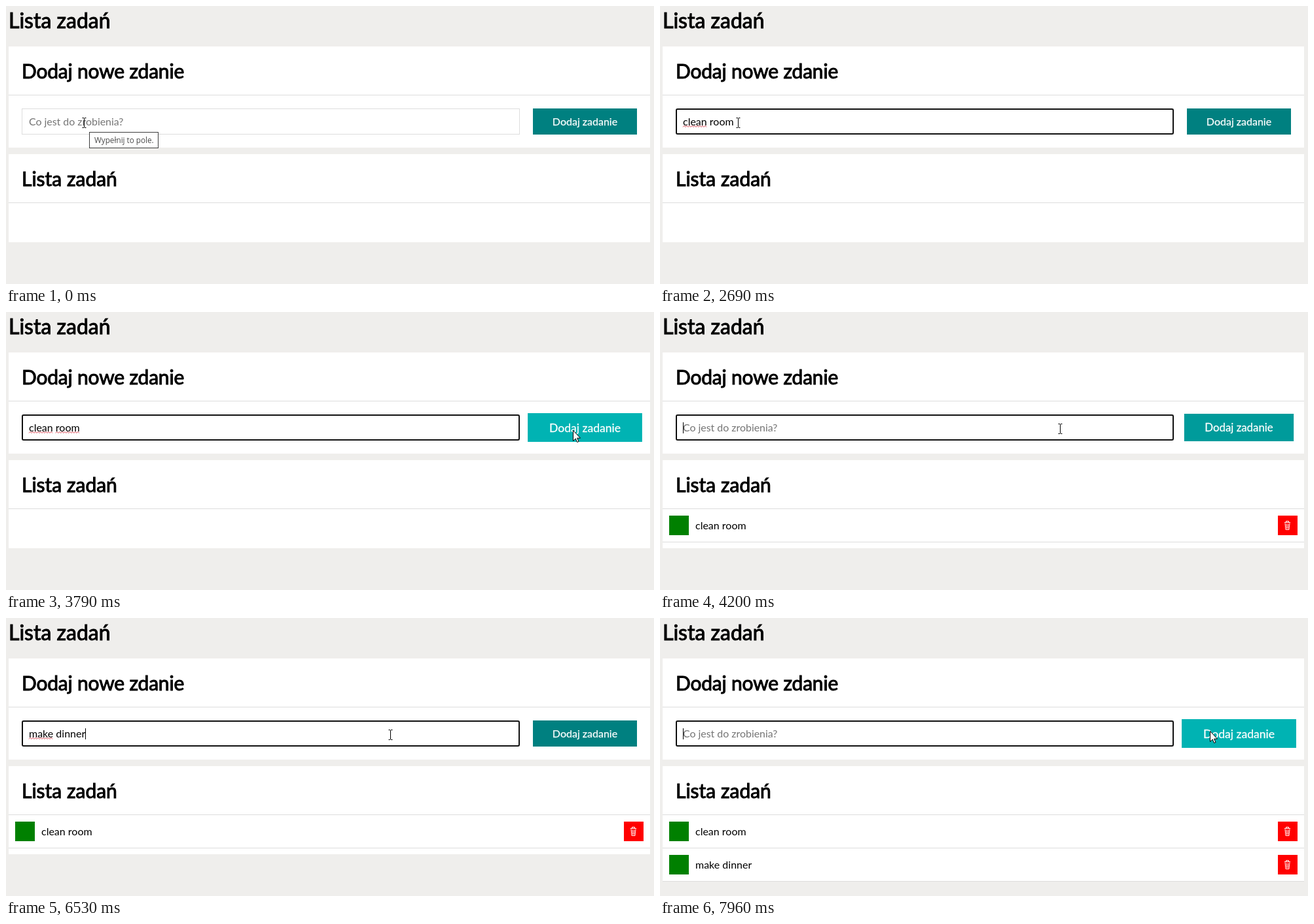
An HTML page that plays this animation: 990 px wide and 426 px high, repeating every 7990 ms.

```html
<!DOCTYPE html>
<html lang="pl">
<head>
<meta charset="utf-8">
<title>Lista zadań</title>
<style>
  html, body { margin: 0; width: 100%; height: 100%; overflow: hidden; background: #efeeec; }
  svg { display: block; width: 990px; height: 426px; }
  text { font: 16px Lato, sans-serif; white-space: pre; }
  .head { stroke: #000; stroke-width: 1; }
  .h1 { font-size: 32px; }
  .h2 { font-size: 30px; }
  .tight { letter-spacing: -.2px; }
  .label { fill: #fff; stroke: #fff; stroke-width: .25; text-anchor: middle; }
  .tip { font: 11.7px "Open Sans", sans-serif; fill: #4a4a4a; }
  .card { fill: #fff; }
  .line { fill: #ddd; }
  .wave { fill: none; stroke: #d8424f; }
  .pen { fill: none; stroke: #000; }
</style>
</head>
<body>
<svg viewBox="0 0 990 426">
  <defs>
    <path id="bin" d="M10 10.5h9M12.5 10v-1.5h4V10M11 11.5l1 10h5l1-10M13.2 12.5l.3 7.500M15.8 12.5l-.3 7.5" fill="none" stroke="#fff"/>
  </defs>
  <text class="head h1" x="4" y="34">Lista zadań</text>

  <rect class="card" x="4" y="62" width="980" height="155"/>
  <text class="head h2 tight" x="24" y="111">Dodaj nowe zdanie</text>
  <rect class="line" x="4" y="136" width="980" height="1"/>

  <rect x="24.5" y="157.5" width="760" height="39" fill="#fff" stroke="#ddd"/>
  <rect id="ring" x="25" y="158" width="759" height="38" rx="2" fill="#fff" stroke="#101010" stroke-width="2"/>
  <text id="hint" x="35" y="183" fill="#757575" letter-spacing="-.05">Co jest do zrobienia?</text>
  <text id="typed" x="35" y="183"></text>
  <path id="wave1" class="wave"/>
  <path id="wave2" class="wave"/>
  <rect id="caret" y="169" width="1" height="17"/>

  <g id="button">
    <rect id="face" x="-79.5" y="-20" width="159" height="40"/>
    <text class="label" y="6">Dodaj zadanie</text>
  </g>

  <rect id="list" class="card" x="4" y="227" width="980"/>
  <text class="head h2" x="24" y="276">Lista zadań</text>
  <rect class="line" x="4" y="301" width="980" height="1"/>
  <g id="items"></g>

  <g id="tip">
    <rect x="127.5" y="193.5" width="105" height="24" fill="#fff" stroke="#3c3c3c"/>
    <text class="tip" x="135" y="210">Wypełnij to pole.</text>
  </g>

  <path id="beam" class="pen" d="M-3 -8H-.5M.5 -8H3M-3 7H-.5M.5 7H3M0 -7.5V6.5"/>
  <path id="arrow" d="M.5 .5V16.5L4.2 13L6.6 18.5L9 17.5L6.6 12.2H11.5Z" fill="#fff" stroke="#000"/>
</svg>
<script>
const LOOP = 7990, BLINK = 535, FOCUS = 440, FADE = 70, HOVER = 500, SPELL = 2800;
const $ = id => document.getElementById(id);
const set = (el, attrs) => { for (const k in attrs) el.setAttribute(k, attrs[k]); };
const show = (el, on) => { el.style.display = on ? '' : 'none'; };

// Each burst of typing: letters, start, time per letter
const tasks = [
  { text: 'clean room', added: 3920, bursts: [['c', 840, 0], ['lean ', 1140, 105], ['room', 1760, 130]] },
  { text: 'make dinner', added: 7800, bursts: [['make ', 5180, 105], ['dinner', 5800, 146]] }
];
for (const task of tasks)
  task.keys = task.bursts.flatMap(([s, start, step]) => [...s].map((_, i) => start + i * step));
const resets = [FOCUS, ...tasks.flatMap(k => [...k.keys, k.added])];

const hovers = [{ enter: 3335, leave: 4060 }, { enter: 7385, leave: LOOP }];

const rest = { x: 119, y: 179 };
const moves = [
  { start: 2800, end: 3460, x: 866, y: 181, dip: 27 },
  { start: 3930, end: 4260, x: 587, y: 179, dip: 0 },
  { start: 7080, end: 7500, x: 849, y: 172, dip: 0 },
  { start: 7500, end: 7960, x: 840, y: 173, dip: 0 }
];

tasks.forEach((task, i) => {
  const y = 302 + 51 * i;
  $('items').insertAdjacentHTML('beforeend', `<g>
    <rect x="14" y="${y + 10}" width="30" height="30" fill="#008000"/>
    <text x="54" y="${y + 31}">${task.text}</text>
    <rect x="944" y="${y + 10}" width="30" height="30" fill="#f00"/>
    <use href="#bin" x="944" y="${y + 10}"/>
    <rect class="line" x="4" y="${y + 50}" width="980" height="1"/></g>`);
});
const rows = [...$('items').children];

const clamp = x => Math.max(0, Math.min(1, x));
const smooth = u => u * u * (3 - 2 * u);

// CSS "ease": cubic-bezier(.25, .1, .25, 1)
function ease(x) {
  x = clamp(x);
  const bez = (a, b, u) => 3 * a * u * (1 - u) ** 2 + 3 * b * u * u * (1 - u) + u ** 3;
  let lo = 0, hi = 1;
  for (let i = 0; i < 20; i++) {
    const mid = (lo + hi) / 2;
    if (bez(.25, .25, mid) < x) lo = mid; else hi = mid;
  }
  return bez(.1, 1, lo);
}

function pointer(t) {
  let { x, y } = rest;
  for (const m of moves) {
    const u = clamp((t - m.start) / (m.end - m.start));
    x += (m.x - x) * smooth(u);
    y += (m.y - y) * smooth(u) + m.dip * Math.sin(Math.PI * u);
  }
  return [Math.round(x), Math.round(y)];
}

function wave(el, from, to, on) {
  show(el, on);
  if (!on) return;
  let d = `M${from} 185.5`;
  for (let x = from + 2, up = true; x <= to; x += 2, up = !up) d += `L${x} ${up ? 183.5 : 185.5}`;
  set(el, { d });
}

function drawField(t) {
  const focused = t >= FOCUS;
  const task = tasks.find(k => t < k.added);
  const count = task ? task.keys.filter(k => k <= t).length : 0;
  const text = task ? task.text.slice(0, count) : '';
  const typed = $('typed');
  typed.textContent = text;
  const width = n => n ? typed.getSubStringLength(0, n) : 0;

  show($('ring'), focused);
  show($('hint'), !text);

  const space = text.indexOf(' ');
  wave($('wave1'), 35, 35 + width(Math.max(space, 0)), space > 0);
  wave($('wave2'), 35 + width(space + 1), 35 + width(count), task === tasks[0] && t >= SPELL);

  const last = Math.max(...resets.filter(r => r <= t));
  show($('caret'), focused && Math.floor((t - last) / BLINK) % 2 === 0);
  set($('caret'), { x: Math.floor(35 + width(count)) });

  show($('tip'), t < FOCUS + FADE);
  $('tip').style.opacity = clamp((FOCUS + FADE - t) / FADE);
}

function drawButton(t) {
  const p = hovers.reduce((sum, h) => sum + ease((t - h.enter) / HOVER) - ease((t - h.leave) / HOVER), 0);
  const tone = Math.round(128 + 51 * p);
  set($('button'), { transform: `translate(884.5 177) scale(${1 + .1 * p})` });
  set($('face'), { fill: `rgb(0,${tone},${tone})` });
}

function drawList(t) {
  const done = tasks.filter(k => t >= k.added).length;
  rows.forEach((row, i) => show(row, i < done));
  set($('list'), { height: 75 + Math.max(60, 51 * done) });
}

function drawPointer(t) {
  const [x, y] = pointer(t);
  const inField = x < 785 && y < 197;
  show($('beam'), inField);
  show($('arrow'), !inField);
  set($('beam'), { transform: `translate(${x + .5} ${y + .5})` });
  set($('arrow'), { transform: `translate(${x} ${y})` });
}

function tick() {
  const t = performance.now() % LOOP;
  drawField(t);
  drawButton(t);
  drawList(t);
  drawPointer(t);
  requestAnimationFrame(tick);
}
tick();
</script>
</body>
</html>
```
